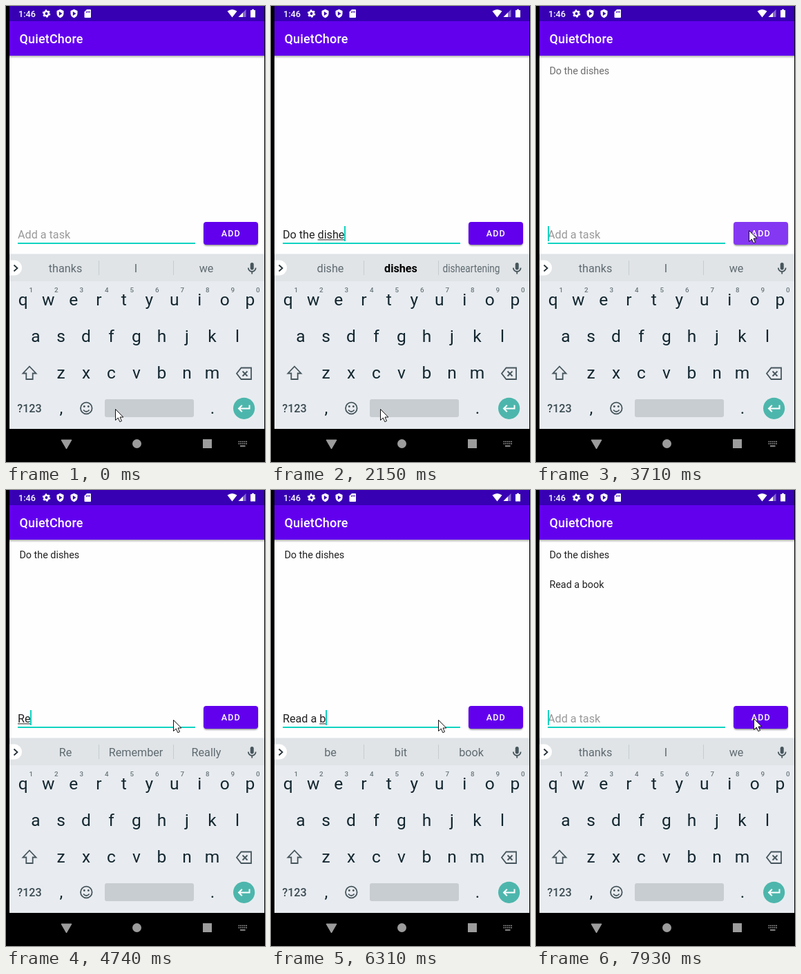
These frames come from a looping animation (375x661 px, 8 s). An HTML page:

```html
<!DOCTYPE html>
<html lang="en">
<head>
<meta charset="utf-8">
<title>To-do list</title>
<style>
  html, body { margin: 0; width: 100%; height: 100%; overflow: hidden; background: #000; }
  svg { display: block; width: 375px; height: 661px; font-family: Roboto, sans-serif; }
  text { white-space: pre; }
  .mid { text-anchor: middle; }
  .field, .word { font-size: 16.16px; }
  .item { font-size: 14.37px; fill: #212121; }
  .word { fill: #5f6b71; text-anchor: middle; }
  .word.bold { fill: #000; font-weight: 700; }
  .key { font-size: 24.5px; fill: #13262f; text-anchor: middle; }
  .digit { font-size: 9.8px; font-weight: 500; fill: #68757b; text-anchor: middle; }
  .line { fill: none; stroke: #46555c; stroke-width: 1.8; }
</style>
</head>
<body>
<svg viewBox="0 0 375 661">
  <defs>
    <linearGradient id="drop" x2="0" y2="1">
      <stop stop-color="#000" stop-opacity=".3"/>
      <stop offset="1" stop-color="#000" stop-opacity="0"/>
    </linearGradient>
    <filter id="soft" x="-10%" y="-20%" width="120%" height="150%">
      <feGaussianBlur stdDeviation="1.1"/>
    </filter>
    <g id="shield">
      <path d="M0-6.2 5-4V0C5 3 2.8 5.400 0 6.200-2.800 5.400-5 3-5 0V-4Z" fill="#fff"/>
      <path d="M-1.700-3 3 0-1.700 3Z" fill="#3700b3"/>
    </g>
  </defs>

  <rect width="375" height="661"/>
  <rect x="5" y="72" width="369" height="288" fill="#fefefe"/>
  <rect x="5" y="72" width="369" height="4" fill="url(#drop)"/>
  <rect x="5" width="369" height="22" fill="#3700b3"/>
  <rect x="5" y="22" width="369" height="50" fill="#6200ee"/>

  <!-- status bar -->
  <g fill="#fff">
    <text x="18" y="16" font-size="12.6" font-weight="500">1:46</text>
    <g fill="none" stroke="#fff">
      <circle cx="58.500" cy="11" r="3.200" stroke-width="2.500"/>
      <circle cx="58.500" cy="11" r="4.900" stroke-width="1.700" stroke-dasharray="2.565"/>
    </g>
    <use href="#shield" x="78.500" y="11"/>
    <use href="#shield" x="98.500" y="11"/>
    <path d="M117 5H122Q123 5 123 6V16Q123 17 122 17H114.500Q113.500 17 113.500 16V8.500Z"/>
    <path d="M116.500 7.500V10M118.700 7V10M120.900 7V10" stroke="#3700b3"/>
    <path d="M320.500 7.500Q327.500 2.500 334.500 7.500L327.500 16.500Z"/>
    <path d="M347.500 5V16H336.500Z" opacity=".4"/>
    <path d="M343 9.500V16H336.500Z"/>
    <path d="M354 6H356V4.800H359V6H361V16.500H354Z"/>
  </g>
  <text x="19.400" y="53.700" font-size="17.96" font-weight="500" letter-spacing=".2" fill="#fff">QuietChore</text>

  <!-- list and input row -->
  <text class="item" id="item1" x="19.400" y="99">Do the dishes</text>
  <text class="item" id="item2" x="19.400" y="142">Read a book</text>
  <text class="field" id="field" x="17" y="336.700"></text>
  <rect id="compose" y="338.400" height="1" fill="#212121"/>
  <rect x="17" y="343" width="257" height="2" fill="#0fd3c1"/>
  <rect id="caret" y="319" width="2" height="22" fill="#0fd3c1"/>
  <rect x="286.500" y="315" width="78" height="32.500" rx="4" opacity=".45" filter="url(#soft)"/>
  <rect x="286" y="313" width="79" height="33" rx="4" fill="#6200ee"/>
  <rect id="ripple" x="286" y="313" width="79" height="33" rx="4" fill="#fff"/>
  <text x="311.700" y="334" font-size="12.57" font-weight="500" letter-spacing="1.120" fill="#fff">ADD</text>

  <!-- keyboard -->
  <rect x="5" y="359" width="369" height="1" fill="#eceff1"/>
  <rect x="5" y="360" width="369" height="39" fill="#e0e4e7"/>
  <rect x="5" y="399" width="369" height="214" fill="#e8ecf0"/>
  <path d="M5 368.500H12A11 11 0 0 1 12 390.500H5Z" fill="#fff"/>
  <path d="M11.500 375.500 16.500 380 11.500 384.500" fill="none" stroke="#263238" stroke-width="1.800"/>
  <path d="M134.500 369V390M242.500 369V390" stroke="#c6cccf"/>
  <rect x="353.700" y="372" width="5" height="10.500" rx="2.500" fill="#46555c"/>
  <path class="line" stroke-width="1.500" d="M350.800 379.500A5.400 5.400 0 0 0 361.600 379.500M356.200 385V388.500"/>
  <g id="words"></g>
  <g id="keys"></g>
  <path class="line" d="M34 522.500 43.500 532.500H38.700V541H29.300V532.500H24.500Z"/>
  <path class="line" d="M340.500 524.500H355V541H340.500L334 532.700Z M342.500 529.500 349.500 536.500M349.500 529.500 342.500 536.500"/>
  <text class="mid" x="34" y="588.500" font-size="16.16" font-weight="500" fill="#3a4a51">?123</text>
  <g class="line" stroke-width="1.600">
    <circle cx="116.300" cy="583" r="8.300"/>
    <path d="M112 585.500Q116.300 590.500 120.600 585.500"/>
  </g>
  <g fill="#46555c"><circle cx="113.300" cy="580.500" r="1.400"/><circle cx="119.300" cy="580.500" r="1.400"/></g>
  <rect x="143" y="570" width="129" height="26" rx="3" fill="#c8cdd1"/>
  <circle cx="344.600" cy="583.300" r="15.600" fill="#4db6ac"/>
  <path d="M352.500 578.500V583.500H337.500M341.800 578.700 337 583.500 341.800 588.300" fill="none" stroke="#fff" stroke-width="2"/>

  <!-- navigation bar -->
  <g fill="#9c9c9c">
    <path d="M80 629H95L87.500 642Z" stroke="#9c9c9c" stroke-linejoin="round"/>
    <circle cx="189.500" cy="634.500" r="6.500"/>
    <rect x="285" y="628" width="13" height="13"/>
    <path d="M336.500 631.500H349M336.500 634.500H349" stroke="#9c9c9c" stroke-width="1.700" stroke-dasharray="1.700 1"/>
    <path d="M339 637.800H346.500" stroke="#9c9c9c" stroke-width="1.700"/>
  </g>

  <path id="mouse" d="M.5 .5V16.500L4.300 13 6.800 18.700 9.500 17.500 7 12H11.800Z" fill="#fff" stroke="#111"/>
</svg>
<script>
const LOOP = 8000, FIELD_X = 17;
const $ = id => document.getElementById(id);
const pen = document.createElement('canvas').getContext('2d');

// [time, typed text, suggestions]; "_" starts the underlined word, "*" marks a bold suggestion
const IDLE = 'thanks I we';
const typing = [
  [0, '', IDLE],
  [260, '_D', 'D Do Did'],
  [530, 'Do ', 'you not it'],
  [680, 'Do _t', 'to the try'],
  [800, 'Do _the', 'the they that'],
  [950, 'Do the ', 'needful same work'],
  [1730, 'Do the _d', 'day dishes do'],
  [1880, 'Do the _di', 'do did difference'],
  [2030, 'Do the _dish', 'dish dishes dishwasher'],
  [2150, 'Do the _dishe', 'dishe *dishes disheartening'],
  [2270, 'Do the _dishes', 'dishes dished dishwasher'],
  [3590, '', IDLE],
  [4490, '_R', 'R Remind Really'],
  [4740, '_Re', 'Re Remember Really'],
  [4860, '_Rea', 'Rea *Read Really'],
  [4980, '_Read', 'Read Ready Reading'],
  [5100, 'Read ', 'the it a'],
  [5910, 'Read _a', 'a and are'],
  [6060, 'Read a ', 'good book few'],
  [6310, 'Read a _b', 'be bit book'],
  [6460, 'Read a _bo', 'box book body'],
  [6580, 'Read a _boo', 'boo *book books'],
  [6750, 'Read a _book', 'book booking look'],
  [7660, '', IDLE]
];
const caret = [[0, 0], [260, 1], [1480, 0], [1730, 1], [2790, 0], [3590, 1], [4090, 0],
  [4490, 1], [5660, 0], [5910, 1], [7160, 0], [7660, 1]];
const mouse = [[0, 158, 584], [3090, 170, 560], [3215, 216, 478], [3340, 276, 374], [3460, 308, 325],
  [3970, 284, 329], [4090, 242, 333], [7300, 262, 336], [7420, 299, 332], [7540, 315, 331]];
const ripple = [[0, 0], [3460, .12], [3590, .24], [3710, .22], [3850, .1], [3970, 0],
  [7540, .2], [7660, .24], [7790, .1], [7930, 0]];
const item1 = [[0, 0], [3590, .25], [3710, .65], [3850, 1]];
const item2 = [[0, 0], [7660, .5], [7790, 1]];

const at = (track, t) => track.findLast(step => step[0] <= t);

function width(text, weight = 400) {
  pen.font = `${weight} 16.16px Roboto, sans-serif`;
  return pen.measureText(text).width;
}

function addText(parent, cls, x, y, text = '') {
  const el = document.createElementNS('http://www.w3.org/2000/svg', 'text');
  el.setAttribute('class', cls);
  el.setAttribute('x', x);
  el.setAttribute('y', y);
  el.textContent = text;
  return parent.appendChild(el);
}

const PITCH = 36.5;
[['qwertyuiop', 24.8, 433.700], ['asdfghjkl', 43, 486.500], ['zxcvbnm', 79.500, 539.500]].forEach(([row, x, y]) =>
  [...row].forEach((key, i) => addText($('keys'), 'key', x + i * PITCH, y, key)));
[...'1234567890'].forEach((d, i) => addText($('keys'), 'digit', 36.200 + i * PITCH, 415, d));
addText($('keys'), 'key', 80, 591, ',');
addText($('keys'), 'key', 299, 591, '.');

const words = [86, 188, 290].map(x => {
  const el = addText($('words'), 'word', 0, 0);
  el.dataset.x = x;
  return el;
});

// Long suggestions are condensed to fit their slot.
function showWord(el, word) {
  const bold = word[0] === '*';
  const text = bold ? word.slice(1) : word;
  const squeeze = Math.min(1, 83 / width(text, bold ? 700 : 400));
  el.textContent = text;
  el.classList.toggle('bold', bold);
  el.setAttribute('transform', `translate(${el.dataset.x} 385.800) scale(${squeeze} 1)`);
}

function showTyping([, typed, suggestions]) {
  const [done, word = ''] = typed.split('_');
  const start = FIELD_X + width(done), end = FIELD_X + width(done + word);
  $('field').textContent = done + word || 'Add a task';
  $('field').setAttribute('fill', typed ? '#212121' : '#999');
  $('compose').setAttribute('x', start);
  $('compose').setAttribute('width', end - start);
  $('caret').setAttribute('x', Math.floor(end));
  suggestions.split(' ').forEach((s, i) => showWord(words[i], s));
}

let shown;
function draw(now) {
  const t = now % LOOP;
  const step = at(typing, t);
  if (step !== shown) showTyping(shown = step);
  Object.entries({ caret, ripple, item1, item2 }).forEach(([id, track]) =>
    $(id).setAttribute('opacity', at(track, t)[1]));
  const [, x, y] = at(mouse, t);
  $('mouse').setAttribute('transform', `translate(${x} ${y})`);
}

let begin;
function tick(now) {
  begin ??= now;
  draw(now - begin);
  requestAnimationFrame(tick);
}
draw(0);
requestAnimationFrame(tick);
</script>
</body>
</html>
```
